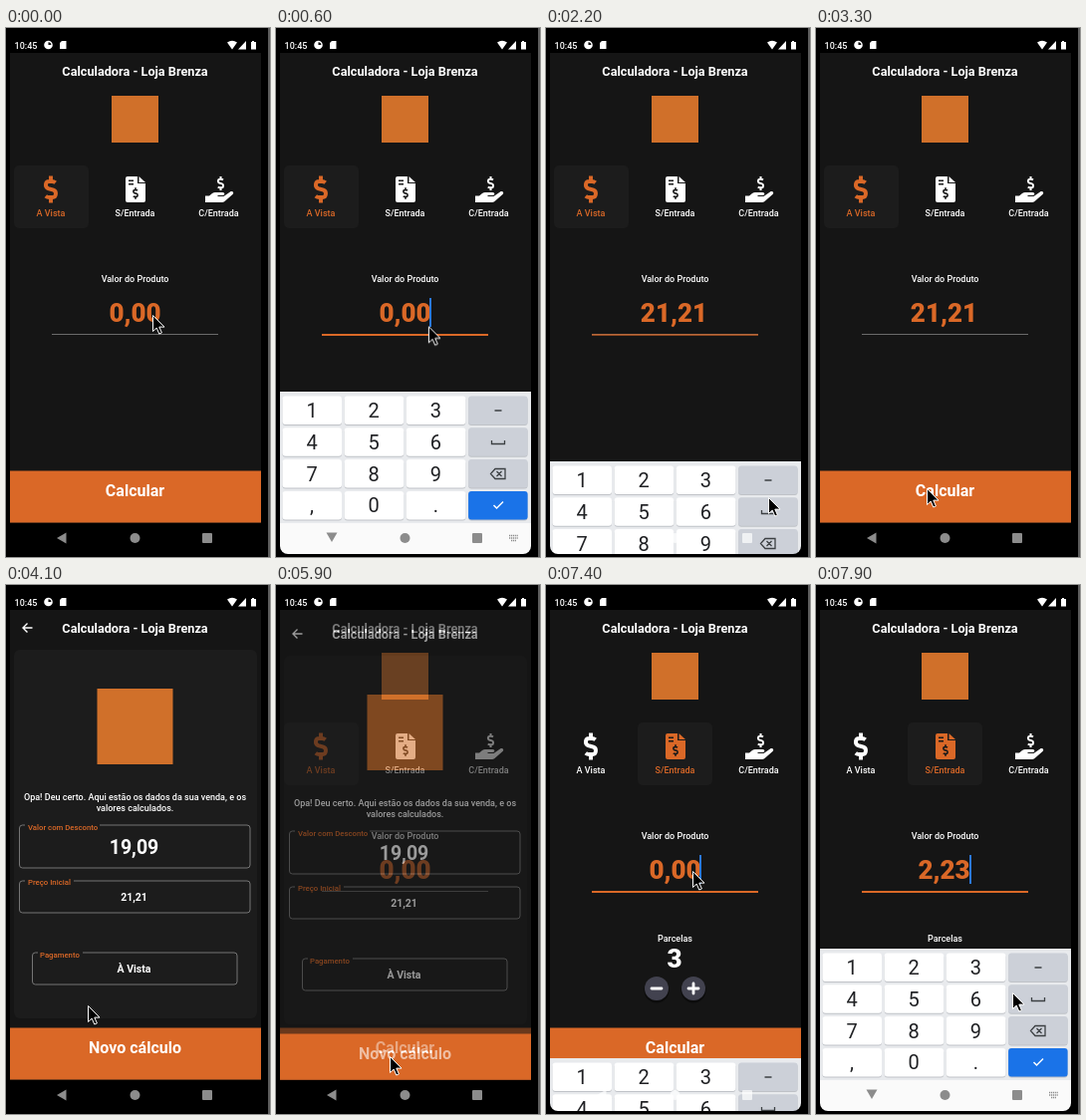
An HTML page that plays this animation: 265 by 531 pixels, repeating every 8000 ms.

```html
<!DOCTYPE html>
<html lang="pt-BR">
<head>
<meta charset="utf-8">
<title>Calculadora</title>
<style>
  html, body { margin: 0; width: 100%; height: 100%; overflow: hidden; background: #000; }
  svg { display: block; width: 100vw; height: 100vh; }
  text { font-family: Roboto, sans-serif; font-weight: 500; text-anchor: middle; }
  .bold { font-weight: 700; }
  .title { font-size: 12.7px; font-weight: 700; }
  .label { font-size: 9px; }
  .hint { font-size: 7.75px; text-anchor: start; fill: #da6827; }
  .num { font-size: 26px; font-weight: 900; }
  .key { font-size: 20px; font-weight: 400; fill: #202124; }
  .icon { fill: currentColor; color: #fff; }

  /* 1.25% of the loop is one 100 ms step */
  .anim { animation: 8s step-end infinite; }
  #pointer { animation-name: pointer; }
  #reel { animation-name: reel; }
  #caret { animation-name: caret; }
  #focus { animation-name: focus; }
  #keyboard { animation-name: keyboard; }
  #nav { animation-name: nav; }
  #back { animation-name: back; }
  #result { animation-name: result; }
  #chosen { animation-name: chosen; }
  #cash { animation-name: cash; }
  #credit { animation-name: credit; }
  #parts { animation-name: parts; }

  @keyframes pointer {
    0% { transform: translate(148px, 289px); }
    6.25% { transform: translate(148px, 289px); animation-timing-function: steps(6); }
    13.75%, 15% { transform: translate(183px, 357px); }
    16.25% { transform: translate(205px, 415px); }
    17.5% { transform: translate(225px, 467px); }
    21.25% { transform: translate(228px, 477px); }
    26.25% { transform: translate(226px, 475px); }
    27.5% { transform: translate(224px, 472px); }
    28.75% { transform: translate(216px, 470px); }
    30% { transform: translate(208px, 468px); }
    33.75% { transform: translate(190px, 466px); animation-timing-function: steps(3); }
    37.5% { transform: translate(112px, 463px); }
    45% { transform: translate(112px, 463px); animation-timing-function: steps(5); }
    51.25% { transform: translate(83px, 423px); }
    52.5% { transform: translate(83px, 423px); animation-timing-function: steps(3); }
    56.25% { transform: translate(212px, 296px); animation-timing-function: steps(3); }
    60% { transform: translate(84px, 508px); }
    61.25% { transform: translate(92px, 486px); }
    66.25% { transform: translate(103px, 480px); }
    67.5% { transform: translate(114px, 473px); }
    70% { transform: translate(115px, 474px); }
    73.75% { transform: translate(115px, 474px); animation-timing-function: steps(6); }
    81.25% { transform: translate(127px, 203px); }
    83.75% { transform: translate(127px, 203px); animation-timing-function: steps(4); }
    88.75% { transform: translate(148px, 288px); }
    93.75% { transform: translate(148px, 288px); animation-timing-function: steps(4); }
    98.75%, 100% { transform: translate(198px, 410px); }
  }
  @keyframes reel {
    0% { transform: none; }
    10% { transform: translateY(-40px); }
    12.5% { transform: translateY(-80px); }
    13.75% { transform: translateY(-120px); }
    16.25% { transform: translateY(-160px); }
    50% { transform: none; }
    95% { transform: translateY(-40px); }
    96.25% { transform: translateY(-200px); }
    98.75%, 100% { transform: translateY(-240px); }
  }
  @keyframes caret {
    0% { opacity: 0; transform: none; }
    3.75% { opacity: 1; transform: none; }
    16.25% { opacity: 1; transform: translateX(6px); }
    21.25% { opacity: 0; transform: none; }
    91.25%, 100% { opacity: 1; transform: none; }
  }
  @keyframes focus {
    0% { opacity: 0; }
    3.75% { opacity: 1; }
    27.5% { opacity: .65; }
    28.75% { opacity: .25; }
    30% { opacity: 0; }
    91.25%, 100% { opacity: 1; }
  }
  @keyframes keyboard {
    0% { transform: translateY(170px); }
    5% { transform: translateY(110px); }
    6.25% { transform: translateY(25px); }
    7.5% { transform: none; }
    26.25% { transform: translateY(18px); }
    27.5% { transform: translateY(70px); }
    28.75% { transform: translateY(132px); }
    30% { transform: translateY(170px); }
    92.5% { transform: translateY(110px); }
    93.75% { transform: translateY(25px); }
    95%, 100% { transform: none; }
  }
  @keyframes nav {
    0% { fill: #8c8c8c; }
    5% { fill: #ffffffb0; }
    7.5% { fill: #8c8c8c; }
    26.25% { fill: #ffffffb0; }
    30% { fill: #8c8c8c; }
    92.5% { fill: #ffffffb0; }
    95%, 100% { fill: #8c8c8c; }
  }
  @keyframes back {
    0% { transform: translate(56px, 512px); }
    6.25% { transform: translate(56px, 512px) rotate(-45deg); }
    7.5% { transform: translate(56px, 511px) rotate(-90deg); }
    27.5% { transform: translate(58px, 512px) rotate(180deg); }
    28.75% { transform: translate(56px, 512px); }
    93.75% { transform: translate(56px, 512px) rotate(-45deg); }
    95%, 100% { transform: translate(56px, 511px) rotate(-90deg); }
  }
  @keyframes result {
    0% { opacity: 0; transform: translateY(118px); }
    42.5% { opacity: .18; transform: translateY(68px); }
    43.75% { opacity: .62; transform: translateY(6px); }
    45% { opacity: 1; transform: none; }
    73.75% { opacity: .57; transform: translateY(6px); }
    75% { opacity: .15; transform: translateY(70px); }
    76.25%, 100% { opacity: 0; transform: translateY(118px); }
  }
  @keyframes chosen { 0% { transform: none; } 83.75%, 100% { transform: translateX(84px); } }
  @keyframes cash { 0% { color: #da6827; } 83.75%, 100% { color: #fff; } }
  @keyframes credit { 0% { color: #fff; } 83.75%, 100% { color: #da6827; } }
  @keyframes parts { 0% { opacity: 0; } 83.75%, 100% { opacity: 1; } }
</style>
</head>
<body>
<svg viewBox="0 0 265 531">
  <defs>
    <clipPath id="app"><rect x="4" y="25" width="252" height="472"/></clipPath>
    <clipPath id="screen"><rect x="4" y="300" width="252" height="228" rx="8"/></clipPath>
    <clipPath id="field"><rect x="46" y="268" width="168" height="34"/></clipPath>
    <!-- dollar sign, 28 by 52, centred on the origin -->
    <path id="dollar" d="M9-13Q6-15.500 2-15.500H-3.500C-11-15.500-12-4.500-5-1.800L5 1.300C12 4 10.500 15.500 3.500 15.500H-3Q-7 15.500-10 13M0-26v10M0 16v10" fill="none" stroke="currentColor" stroke-width="7.600"/>
  </defs>
  <rect width="265" height="531"/>
  <rect x="263" width="2" height="531" fill="#5c5c5c"/>

  <!-- status bar -->
  <g fill="#fff">
    <text class="label" x="20" y="20.500">10:45</text>
    <circle cx="42.500" cy="17" r="4.300"/>
    <path d="M42.500 17v-2.800a2.800 2.800 0 0 1 2.800 2.800z" fill="#000"/>
    <path d="M56 13h4.500v8h-6.500v-6z"/>
    <path d="M222 14.500q5-3.500 10 0l-5 7z"/>
    <path d="M241 13v8.500h-8z"/>
    <path d="M247 13h2v1h2v7.500h-5v-7.500h1z"/>
  </g>

  <g clip-path="url(#app)">
    <!-- calculator page -->
    <rect x="4" y="25" width="252" height="472" fill="#151515"/>
    <g fill="#fff">
      <text class="title" x="129.500" y="48">Calculadora - Loja Brenza</text>
      <rect x="106" y="68" width="47" height="47" fill="#d0702a"/>
      <rect id="chosen" class="anim" x="8" y="138" width="75" height="63" rx="5" fill="#1c1c1c"/>
      <g id="cash" class="icon anim">
        <use href="#dollar" transform="translate(45 162) scale(.52)"/>
        <text class="label" x="45" y="189">A Vista</text>
      </g>
      <g id="credit" class="icon anim">
        <path d="M122 149h10v7h8v17a2 2 0 0 1-2 2h-16a2 2 0 0 1-2-2v-22a2 2 0 0 1 2-2zM133.500 149l6.500 6h-6.500z"/>
        <path d="M123 152.500h5v1.500h-5zM123 156h5v1.500h-5z" fill="#1a1a1a"/>
        <use href="#dollar" transform="translate(130 166) scale(.22)" color="#1a1a1a"/>
        <text class="label" x="129.500" y="189">S/Entrada</text>
      </g>
      <g class="icon">
        <use href="#dollar" transform="translate(215.500 156) scale(.27)"/>
        <path d="M200 168.500h4l3-2.500c1-.8 2-1 3-1h7.500c2.500 0 2.500 3 0 3h-5v1h6l6.500-4.500c2-1.300 4.500.8 2.500 2.500l-8 7c-1 .8-2 1-3 1h-16.500z"/>
        <text class="label" x="213.500" y="189">C/Entrada</text>
      </g>
      <text class="label" x="129.500" y="255">Valor do Produto</text>
    </g>
    <rect x="46" y="307" width="167" height="1" fill="#6a6a6a"/>
    <rect id="focus" class="anim" x="46" y="307" width="167" height="2" fill="#da6827"/>
    <g clip-path="url(#field)">
      <g id="reel" class="anim" fill="#da6827"></g>
    </g>
    <rect id="caret" class="anim" x="154" y="271" width="2" height="29" fill="#2b78dc"/>
    <g id="parts" class="anim" fill="#fff">
      <text class="label" x="129.500" y="358">Parcelas</text>
      <text class="num" x="129" y="384">3</text>
      <g fill="#0c0c0c"><circle cx="111" cy="407" r="12.500"/><circle cx="148" cy="407" r="12.500"/></g>
      <g fill="#42424f"><circle cx="111" cy="405" r="12"/><circle cx="148" cy="405" r="12"/></g>
      <path d="M106 405h10M143 405h10M148 400v10" stroke="#fff" stroke-width="2.800" stroke-linecap="round"/>
    </g>
    <rect x="4" y="444.500" width="252" height="52" fill="#da6827"/>
    <text class="bold" x="129.500" y="470" font-size="16" fill="#fff">Calcular</text>

    <!-- result page -->
    <g id="result" class="anim" fill="#fff">
      <rect x="4" y="25" width="252" height="472" fill="#151515"/>
      <rect x="8" y="65" width="244" height="370" rx="6" fill="#1c1c1c"/>
      <path d="M26.500 43h-9M21.500 38.500l-4.500 4.500l4.500 4.500" fill="none" stroke="#fff" stroke-width="1.400"/>
      <text class="title" x="129.500" y="48">Calculadora - Loja Brenza</text>
      <rect x="91.500" y="104" width="76" height="76" fill="#d0702a"/>
      <text class="label" x="129.500" y="216">Opa! Deu certo. Aqui estão os dados da sua venda, e os</text>
      <text class="label" x="129.500" y="227">valores calculados.</text>
      <g fill="none" stroke="#757575">
        <rect x="13.500" y="241" width="231.500" height="43" rx="3"/>
        <rect x="13.500" y="297" width="231.500" height="32" rx="3"/>
        <rect x="26.500" y="369" width="205.500" height="32" rx="3"/>
      </g>
      <path d="M19 240h75v4h-75zM19 296h49v4h-49zM32 368h45v4h-45z" fill="#1c1c1c"/>
      <text class="hint" x="22" y="245.500">Valor com Desconto</text>
      <text class="hint" x="22" y="301">Preço Inicial</text>
      <text class="hint" x="34" y="373.500">Pagamento</text>
      <text class="bold" x="128.500" y="269.500" font-size="19.500">19,09</text>
      <text class="bold" x="128.500" y="317" font-size="10.500">21,21</text>
      <text class="bold" x="128.500" y="389" font-size="10.500">À Vista</text>
      <rect x="4" y="444.500" width="252" height="52" fill="#da6827"/>
      <text class="bold" x="129.500" y="470" font-size="16">Novo cálculo</text>
    </g>
  </g>

  <g clip-path="url(#screen)">
    <g id="keyboard" class="anim">
      <rect x="4" y="365" width="252" height="132" fill="#e8eaed"/>
      <rect x="4" y="497" width="252" height="110" fill="#fafafa"/>
      <g id="keys"></g>
      <g fill="none" stroke="#3c4043" stroke-width="1.300">
        <path d="M219.500 384h7M216.500 414v3.500h13v-3.500"/>
        <path d="M220 442.500h10v10h-10l-4.500-5zM221.500 445l5 5M226.500 445l-5 5"/>
        <path d="M218.500 479l3 3l6.500-6.500" stroke="#fff" stroke-width="1.500"/>
        <path d="M234 509.500h9M234 512h9M236 514.500h5" stroke="#8c8c8c" stroke-dasharray="1.200 .7"/>
      </g>
    </g>
  </g>

  <g id="nav" class="anim">
    <path id="back" class="anim" d="M-5 0l9.500-5.500v11z"/>
    <circle cx="129.500" cy="512" r="5"/>
    <rect x="197" y="507" width="10" height="10" rx="1"/>
  </g>

  <path id="pointer" class="anim" d="M-.5-.5v16l3.700-3.400l2.600 5.900l2.600-1.100l-2.600-5.800h5.200z" fill="#000" stroke="#fff"/>
</svg>
<script>
  const add = (parent, tag, attrs, text = '') => {
    const el = document.createElementNS('http://www.w3.org/2000/svg', tag);
    for (const name in attrs) el.setAttribute(name, attrs[name]);
    el.textContent = text;
    parent.append(el);
  };

  // Values the field scrolls through, 40px apart
  const reel = document.getElementById('reel');
  ['0,00', '0,02', '0,21', '2,12', '21,21', '0,22', '2,23'].forEach((value, i) =>
    add(reel, 'text', { class: 'num', x: i ? 128.5 : 129.5, y: 295 + 40 * i }, value));

  const keys = document.getElementById('keys');
  ['123 ', '456 ', '789 ', ',0. '].forEach((row, r) => [...row].forEach((char, c) => {
    const x = 6.5 + 62.2 * c, y = 369.5 + 31.8 * r;
    const fill = c < 3 ? '#fff' : r < 3 ? '#ccd0d8' : '#1a73e8';
    const box = { x, width: 59.5, height: 28.5, rx: 3 };
    add(keys, 'rect', { ...box, y: y + 1, fill: '#bfc2c7' });
    add(keys, 'rect', { ...box, y, fill });
    add(keys, 'text', { class: 'key', x: x + 29.5, y: y + 21.5 }, char);
  }));
</script>
</body>
</html>
```
